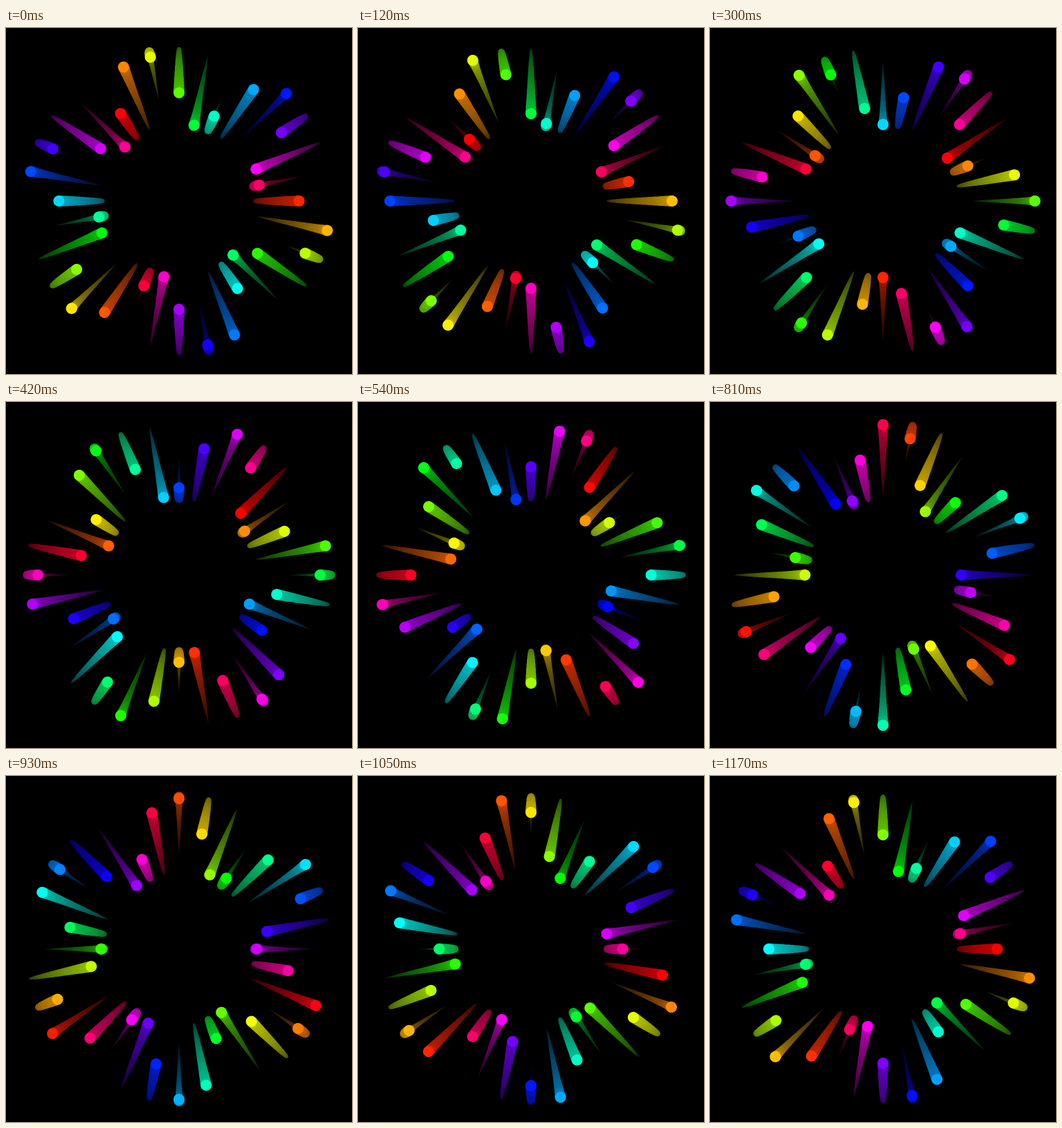
These frames come from a looping animation (500x500 px, 1.2 s). An HTML page with a canvas:

```html
<!DOCTYPE html>
<html lang="en">
<head>
<meta charset="utf-8">
<title>Rainbow comet ring</title>
<style>
  html, body { margin: 0; width: 100%; height: 100%; overflow: hidden; background: #000; }
  canvas { display: block; width: 500px; height: 500px; }
</style>
</head>
<body>
<canvas id="stage" width="1000" height="1000"></canvas>
<script>
const LOOP = 1200, STEP = 30;
const SPOKES = 32, HEAD = 8;
const MID = 165, SWING = 55;
const TRAIL = 144; // degrees of phase behind the head
const ctx = document.getElementById('stage').getContext('2d');
const rad = deg => deg * Math.PI / 180;

// Drawn at double size so that stacked dots keep clean edges.
ctx.scale(2, 2);

function dot(phase, size, color) {
  ctx.fillStyle = color;
  ctx.beginPath();
  ctx.arc(MID + SWING * Math.sin(rad(phase)), 0, size, 0, 2 * Math.PI);
  ctx.fill();
}

function drawSpoke(k, base) {
  const phase = base + 67.5 * k;
  const hue = (base + 33.75 * k) % 360;
  const shade = light => `hsl(${hue}, 100%, ${50 * light}%)`;
  ctx.save();
  ctx.translate(250, 250);
  ctx.rotate(rad(11.25 * k));
  for (let lag = TRAIL - 1; lag > 2; lag--) {
    const age = lag / TRAIL;
    dot(phase - lag, HEAD * (1 - age), shade(0.75 - 0.65 * age));
  }
  dot(phase, HEAD, shade(1));
  ctx.restore();
}

function draw(time) {
  const base = 360 * (time + STEP) / LOOP;
  ctx.fillStyle = '#000';
  ctx.fillRect(0, 0, 500, 500);
  for (let k = 0; k < SPOKES; k++) drawSpoke(k, base);
}

let start = null, shown = 0;
function tick(now) {
  if (start === null) start = now;
  const time = Math.floor(((now - start) % LOOP) / STEP + 1e-6) * STEP;
  if (time !== shown) draw(shown = time);
  requestAnimationFrame(tick);
}
draw(0);
requestAnimationFrame(tick);
</script>
</body>
</html>
```
